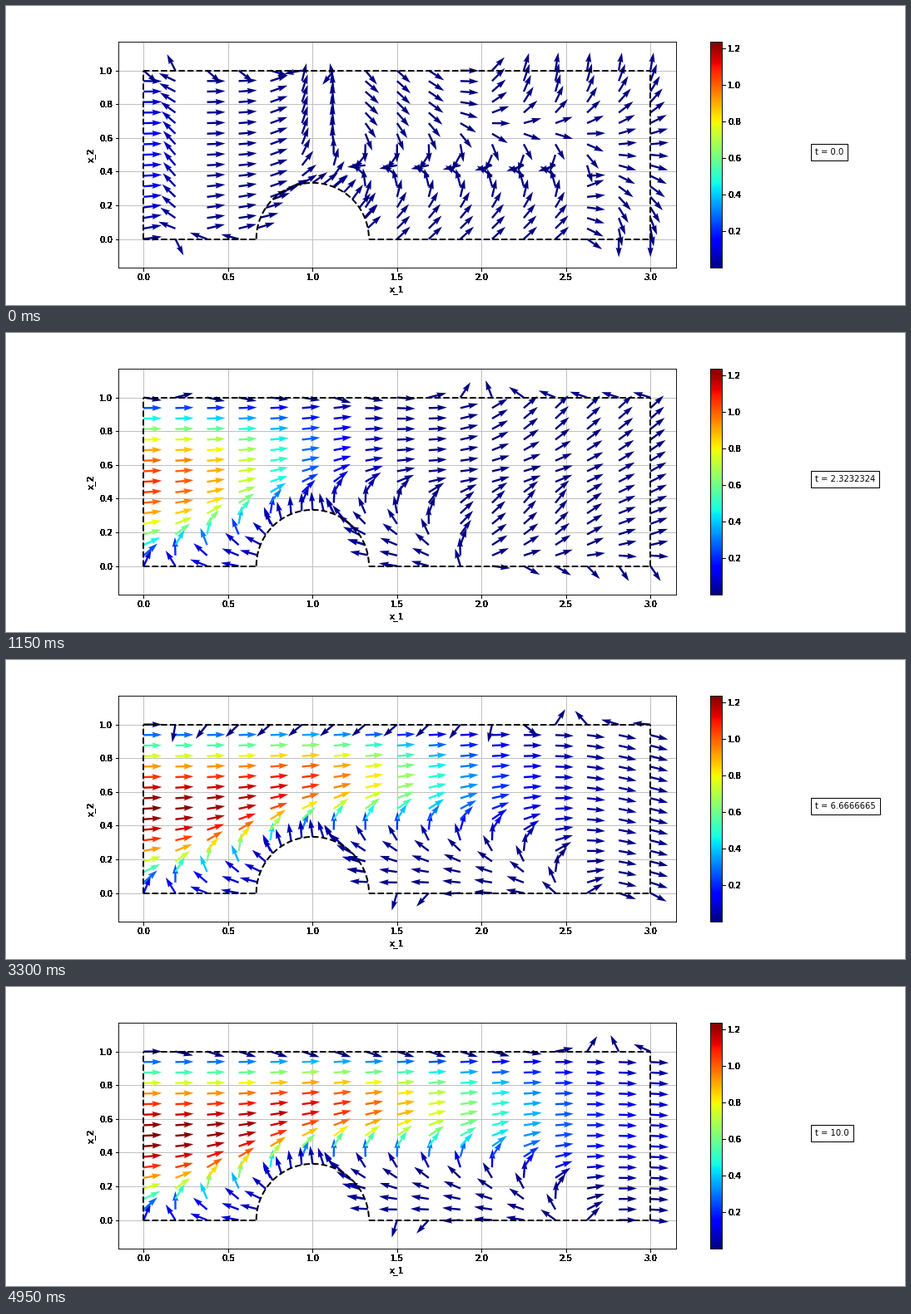
Animation of 1080x360 px, one loop 5000 ms. Source, as a matplotlib script:

```python
import numpy as np
import matplotlib.pyplot as plt
from matplotlib.animation import FuncAnimation

plt.rcParams.update({
    "font.family": "DejaVu Sans", "font.size": 10,
    "figure.subplot.bottom": 0.125, "axes.linewidth": 0.9,
})

FRAMES = 100
TIMES = np.linspace(0, 10, FRAMES, dtype=np.float32)
RADIUS = 1 / 3


def sample_points():
    gx, gy = np.meshgrid(np.linspace(0, 3, 17), np.linspace(0, 1, 17))
    free = np.hypot(gx - 1, gy) > RADIUS
    a = np.linspace(0, np.pi, 17)[1:-1]
    return (np.append(gx[free], 1 + RADIUS * np.cos(a)),
            np.append(gy[free], RADIUS * np.sin(a)))


X, Y = sample_points()


def step(v, center, width):
    return 1 / (1 + np.exp(-(v - center) / width))


def bell(v, center, width):
    return np.exp(-((v - center) / width) ** 2)


def heading(degrees):
    a = np.radians(degrees)
    return np.array([np.cos(a), np.sin(a)])


def speed(t):
    """Parabolic inflow that ramps up while its front travels downstream."""
    inflow = 1.24 * (1 - np.exp(-(t + 0.15) / 1.3))
    front = 2.4 * (1 - np.exp(-t / 6.5))
    width = 0.15 + 0.028 * t
    reach = step(front, X, width) / step(front, 0, width)
    bed = 0.33 * np.exp(-((X - 1) / np.where(X < 1, 0.42, 2.2)) ** 2)
    profile = np.clip(4 * (Y - bed) * (1 - Y) / (1 - bed) ** 2, 0, None)
    creep = 0.1 * np.exp(-X ** 2) * (Y < 0.99)
    return inflow * np.maximum(reach * profile, creep)


def rest_heading():
    """Three zones of the still fluid, blended along x."""
    lid, floor = step(Y, 0.97, 0.01), step(0.03, Y, 0.01)
    left = (160 * bell(X, 0.19, 0.08) + 30 * step(X, 0.75, 0.1)
            + 75 * step(X, 0.9, 0.06) * step(Y, 0.42, 0.05)
            + lid * (175 * step(X, 0.85, 0.03) - 45)
            + floor * 170 * (1 - np.exp(-X / 0.1)))
    middle = (40 + 275 * step(Y, 0.42, 0.09)
              + 130 * step(X, 1.95, 0.12) * step(Y, 0.65, 0.08))
    right = 170 * Y - 90
    a, b = step(X, 1.22, 0.04), step(X, 2.62, 0.03)
    return ((1 - a) * heading(left) + a * (1 - b) * heading(middle)
            + b * heading(right))


def flow_heading(t):
    """Stream above a backflow layer that wraps the hill and its wake."""
    wake = max(0.9, 2.65 - 1.65 * np.exp((1.5 - t) / 0.9))
    rise = np.interp(X, [0, 0.375, 0.75, 1.2], [-0.06, 0.15, 0.28, 0.37])
    edge = np.minimum(rise, 0.36 - 0.5 * (X / wake) ** 8).clip(-1)
    angle = (160 * step(edge, Y, 0.08)
             + 20 * np.exp(-np.clip(Y - edge, 0, None) / 0.3))

    tilt = np.interp(t, [1.5, 3.1, 5, 7.3, 10], [50, 22, -8, -18, -3])
    angle += tilt * step(X, min(1.5 + 0.17 * t, 2.6), 0.15)
    angle -= (210 * np.exp(-t / 2.5) * np.exp(-Y / 0.05)
              * step(X, wake, 0.1))
    angle += 80 * step(t, 4, 0.4) * bell(X, 1.55, 0.2) * np.exp(-Y / 0.02)

    turn = step(X, 1.7 + 0.1 * t, 0.15)
    dip = 140 * bell(t, 6.7, 2.3) * (1 - np.exp(-X / 0.15))
    lid = 180 * turn - dip * (1 - turn)
    return heading(np.where(Y > 0.99, lid, angle))


REST = rest_heading()


def direction(t):
    fade = np.exp(-t / 0.8)
    v = (0.1 * fade * REST
         + (speed(t) + 0.02 * (1 - fade)) * flow_heading(t))
    return v / (np.hypot(*v) + 1e-9)


def harden(image, dpi):
    """Turn soft edges into solid pixels."""
    image = image.copy()
    image[..., 3] = image[..., 3] > 0.05
    return image, 0, 0


fig, ax = plt.subplots(figsize=(15, 5), dpi=72, facecolor="white")
quiver = ax.quiver(X, Y, *direction(0), speed(0), cmap="jet")
quiver.set_clim(0.002, 1.237)
bar = fig.colorbar(quiver, ax=ax)

arc = np.linspace(np.pi, 0, 120)
for xs, ys in [
    ([0, 0], [0, 1]), ([3, 3], [0, 1]), ([0, 3], [1, 1]),
    ([0, 1 - RADIUS], [0, 0]), ([1 + RADIUS, 3], [0, 0]),
    (1 + RADIUS * np.cos(arc), RADIUS * np.sin(arc)),
]:
    ax.plot(xs, ys, "k--", lw=2)

ax.set_xlim(-0.15, 3.15)
ax.set_ylim(0.5 - 0.6698, 0.5 + 0.6698)
ax.set_xticks(np.arange(0, 3.1, 0.5))
ax.set_yticks(np.arange(0, 1.1, 0.2))
ax.set_xlabel("x_1")
ax.set_ylabel("x_2")
ax.set_axisbelow(True)
ax.grid(color="#c0c0c0")
for axis in (ax.xaxis, ax.yaxis, bar.ax.yaxis):
    axis.set_agg_filter(harden)

clock = ax.text(1.25, 0.5, "", transform=ax.transAxes,
                bbox={"facecolor": "white", "pad": 5})


def update(i):
    t = TIMES[i]
    quiver.set_UVC(*direction(float(t)), speed(float(t)))
    clock.set_text(f"t = {str(t)}")
    return quiver, clock


anim = FuncAnimation(fig, update, frames=FRAMES, interval=50,
                     repeat=True, repeat_delay=0)
plt.show()
```
